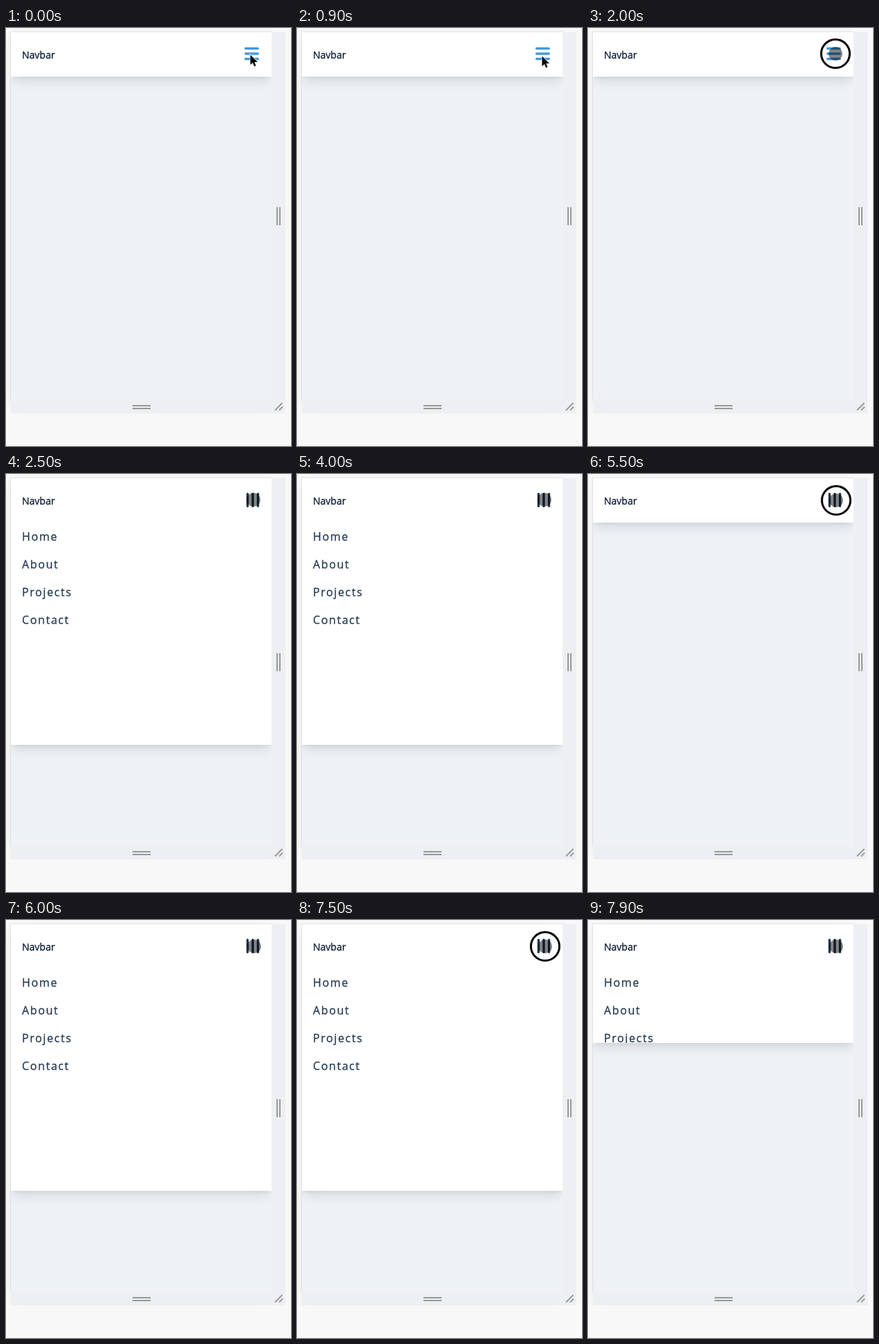
Recreate the animation shown at these times as an HTML page. Size 410 px wide and 602 px high, loop 8000 ms.

```html
<!DOCTYPE html>
<html lang="en">
<head>
<meta charset="utf-8">
<title>Responsive navbar</title>
<style>
  html, body { margin: 0; width: 100%; height: 100%; overflow: hidden; background: #f8f8f8; }
  div, svg { position: absolute; }
  #device {
    left: 7px; top: 6px; width: 375px; height: 530px;
    box-shadow: 0 0 0 1px rgba(0, 0, 0, .08), 0 8px 20px rgba(0, 0, 0, .06);
  }
  #page { inset: 0; overflow: hidden; background: #eef2f7; }
  #nav {
    width: 375px; height: 64px; background: #fff;
    box-shadow: 0 10px 15px -3px rgba(0, 0, 0, .1), 0 4px 6px -2px rgba(0, 0, 0, .05);
  }
  #menu { inset: 0; overflow: hidden; font-family: "Open Sans", "Noto Sans", sans-serif; }
  #menu svg { left: 0; top: 0; }
  text { stroke-width: .3; }
  .gutter { background: #eeeff2; }
  #right { left: 382px; top: 6px; width: 20px; height: 530px; }
  #bottom { left: 7px; top: 536px; width: 395px; height: 19px; }
  #overlay { left: 0; top: 0; }
</style>
</head>
<body>
<div id="device">
  <div id="page">
    <div id="nav"><div id="menu">
      <svg width="375" height="384" viewBox="7 6 375 384">
        <text x="23" y="44" font-size="14" fill="#0b1d33" stroke="#0b1d33">Navbar</text>
        <g font-size="16" letter-spacing="1.6" fill="#243b53" stroke="#243b53">
          <text x="23" y="96">Home</text>
          <text x="23" y="136">About</text>
          <text x="23" y="176">Projects</text>
          <text x="23" y="216">Contact</text>
        </g>
        <path id="icon" d="M344.7 29.5h17.6M344.7 37h17.6M344.7 44.5h17.6"
          stroke-width="3.4" stroke-linecap="round"/>
      </svg>
    </div></div>
  </div>
</div>
<div id="right" class="gutter"></div>
<div id="bottom" class="gutter"></div>
<svg id="overlay" width="410" height="602">
  <path d="M390 258v26M394 258v26M182 544h26M182 548h26M387 550.5l10.5-10.5M393 550.5l5-5"
    stroke="#999" stroke-width="2"/>
  <circle id="touch" r="10" fill-opacity=".48"/>
  <circle id="ring" r="20.5" fill="none" stroke="#000" stroke-width="3"/>
  <path id="arrow" d="M0 0v14.6l3.4-3.2 2.3 5.3 2.4-1-2.3-5.2h4.7z"
    stroke="#fff" stroke-width="1.6" paint-order="stroke"/>
  <path id="resize" d="M-9 0l5-4.5v3.5h8v-3.5l5 4.5-5 4.5v-3.5h-8v3.5z"
    stroke="#fff" stroke-width="1.6" paint-order="stroke"/>
</svg>
<script>
const LOOP = 8000, STEP = 100, FADE = 250, DELAY = 252;
const FOCUS_CLICK = 300, TAPS = [2000, 3800, 5500, 7500];
const el = id => document.getElementById(id);

const span = (t, start, length) => Math.min(1, Math.max(0, (t - start) / length));
const easeInOut = k => k < .5 ? 2 * k * k : 1 - 2 * (1 - k) * (1 - k);
const fade = (t, start) => easeInOut(span(t, start, FADE));
const bump = k => Math.sin(Math.PI * k);

// Drifts onto the icon, then makes one trip to the right gutter and back
function pointerAt(t) {
  const drift = span(t, 600, 900), trip = span(t, 4600, 500);
  return [
    351.5 + 4.5 * easeInOut(drift) + 35 * bump(trip) + trip,
    38.5 - 1.5 * drift + 3 * bump(drift) + trip
  ];
}

function place(id, [x, y], visible) {
  el(id).setAttribute('transform', `translate(${x} ${y})`);
  el(id).style.display = visible ? '' : 'none';
}

function draw(t) {
  // Every tap toggles the menu
  const open = TAPS.reduce((sum, tap, i) =>
    sum + (i % 2 ? -1 : 1) * fade(t, tap + DELAY), 0);
  el('nav').style.height = 64 + 320 * open + 'px';

  const turn = fade(t, TAPS[0] + 50);
  const mix = (a, b) => Math.round(a + (b - a) * turn);
  el('icon').setAttribute('transform', `rotate(${90 * turn} 354 38)`);
  el('icon').setAttribute('stroke', `rgb(${mix(66, 30)},${mix(153, 52)},${mix(225, 76)})`);

  const pointer = pointerAt(t);
  const inGutter = pointer[0] > 382, touching = t >= TAPS[0];
  el('right').style.background = inGutter ? '#d8d9dc' : '';
  place('arrow', pointer, !touching);
  place('touch', pointer, touching && !inGutter);
  place('resize', pointer, inGutter);
  place('ring', pointer, [FOCUS_CLICK, ...TAPS].some(c => t >= c && t < c + 200));
}

function tick() {
  const t = performance.now() % LOOP;
  draw(Math.floor(t / STEP) * STEP);
  requestAnimationFrame(tick);
}
tick();
</script>
</body>
</html>
```
